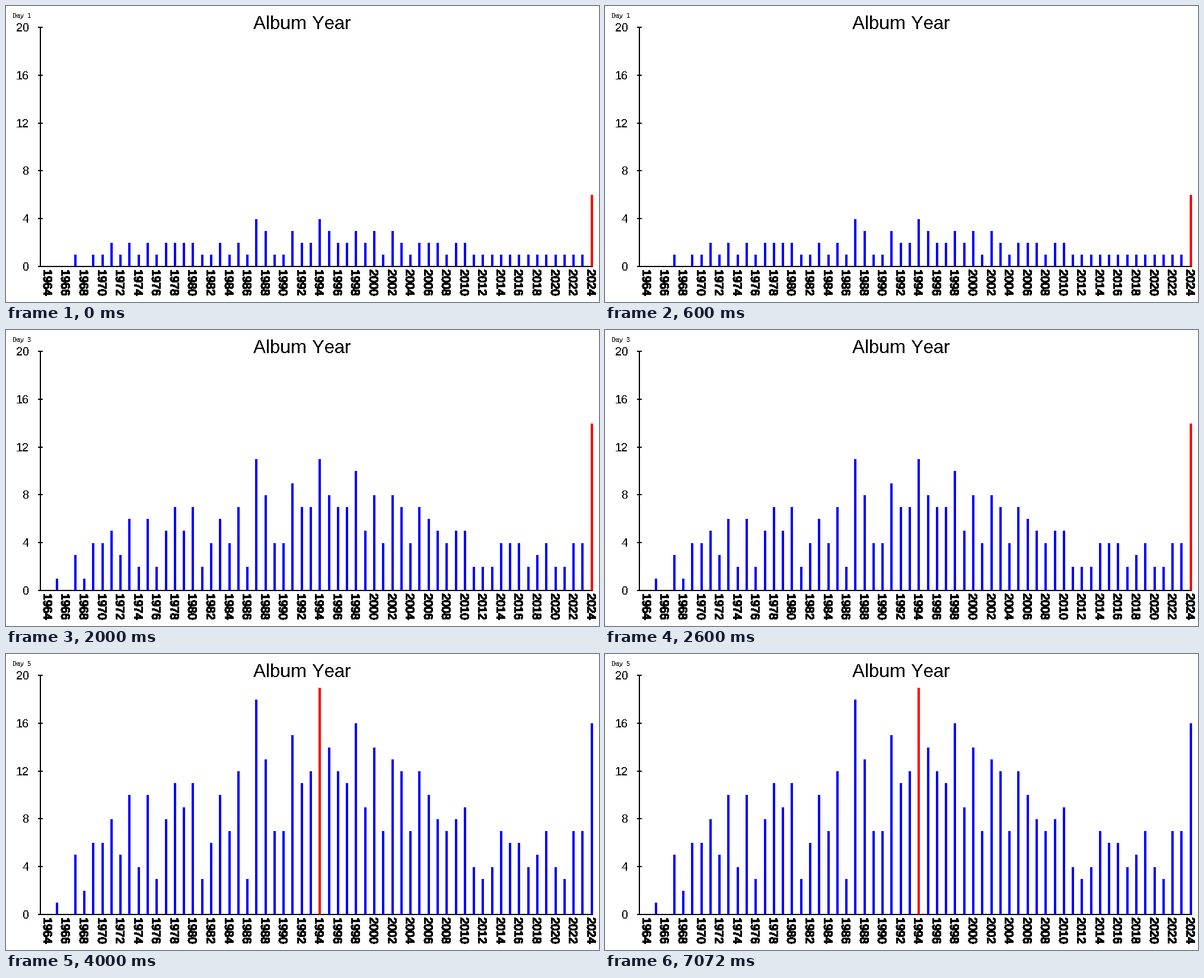
Write a matplotlib script that moves like this. It is 1000 px wide and 500 px high and loops after 9.12 s.

```python
import matplotlib.pyplot as plt
from matplotlib.animation import FuncAnimation
from matplotlib.patches import PathPatch, Rectangle
from matplotlib.path import Path
from matplotlib.textpath import TextPath

plt.rcParams.update({
    "font.family": "Liberation Sans",
    "text.kerning_factor": 6,
    "text.hinting": "native",
    "text.hinting_factor": 1,
})

W, H, DPI = 1000, 500, 100
STEP, LOOP = 40, 9120    # ms per frame, ms per loop
DAY_MS, DAYS = 1000, 5   # the last day stays until the loop ends
BASE = 440
FIRST, LAST = 1965, 2024

# Albums per release year once all days are counted
totals = [1, 0, 5, 2, 6, 6, 8, 5, 10, 4, 10, 3, 8, 11, 9,
          11, 3, 6, 10, 7, 12, 3, 18, 13, 7, 7, 15, 11, 12, 19,
          14, 12, 11, 16, 9, 14, 7, 13, 12, 7, 12, 10, 8, 7, 8,
          9, 4, 3, 4, 7, 6, 6, 4, 5, 7, 4, 3, 7, 7, 16]
newest = [6, 11, 14, 14, 16]   # the newest year leads early, then slows down

fig = plt.figure(figsize=(W / DPI, H / DPI), dpi=DPI, facecolor="white")
ax = fig.add_axes([0, 0, 1, 1])
ax.set_xlim(0, W)
ax.set_ylim(H, 0)
ax.axis("off")


def year_x(year):
    return round(86.2 + 15.28 * (year - FIRST))


def counts_on(day):
    """Every year grows evenly from day to day, except the newest one."""
    counts = [int(n * day / DAYS + 0.5) for n in totals]
    counts[-1] = newest[day - 1]
    return counts


def box(x0, y0, x1, y1, color="black", z=1):
    return ax.add_patch(Rectangle((x0, y0), x1 - x0, y1 - y0, facecolor=color,
                                  linewidth=0, antialiased=False, zorder=z))


def label(x, y, text, px, ha="left"):
    return ax.text(x, y, text, fontsize=px * 72 / DPI, ha=ha, va="baseline",
                   antialiased=False)


def downward(text, x, y, px):
    """Outline of a text that reads from top to bottom."""
    path = TextPath((0, 0), text, size=px, prop={"family": "Liberation Sans"})
    return Path(path.vertices[:, ::-1] + (x, y), path.codes)


# Axes
box(57, 35, 59, 441)
box(57, 439, 990, 441)
for tick in range(0, 21, 4):
    y = round(BASE - 20.2 * tick)
    box(54, y - 1, 62, y + 1)
    label(39, y + 7, str(tick), 20, "right")

years = [downward(str(year), year_x(year) - 7.5, 445, 20)
         for year in range(FIRST - 1, LAST + 1, 2)]
ax.add_patch(PathPatch(Path.make_compound_path(*years), facecolor="black",
                       edgecolor="black", linewidth=0.5, antialiased=False))

label(417, 39, "Album Year", 32)
day_text = label(11, 20, "", 11)

bars = []
for year in range(FIRST, LAST + 1):
    x = year_x(year)
    bars.append(box(x - 2, BASE, x + 2, BASE, "blue", 2))


def draw(frame):
    day = min(frame * STEP // DAY_MS + 1, DAYS)
    counts = counts_on(day)
    top = max(counts)
    for bar, count in zip(bars, counts):
        bar.set_height(-(202 * count // 10))
        bar.set_facecolor("red" if count == top else "blue")
        bar.set_visible(count > 0)
    day_text.set_text(f"Day  {day}")
    return bars + [day_text]


anim = FuncAnimation(fig, draw, frames=LOOP // STEP, interval=STEP,
                     init_func=lambda: draw(0), repeat=True, repeat_delay=0)
plt.show()
```
